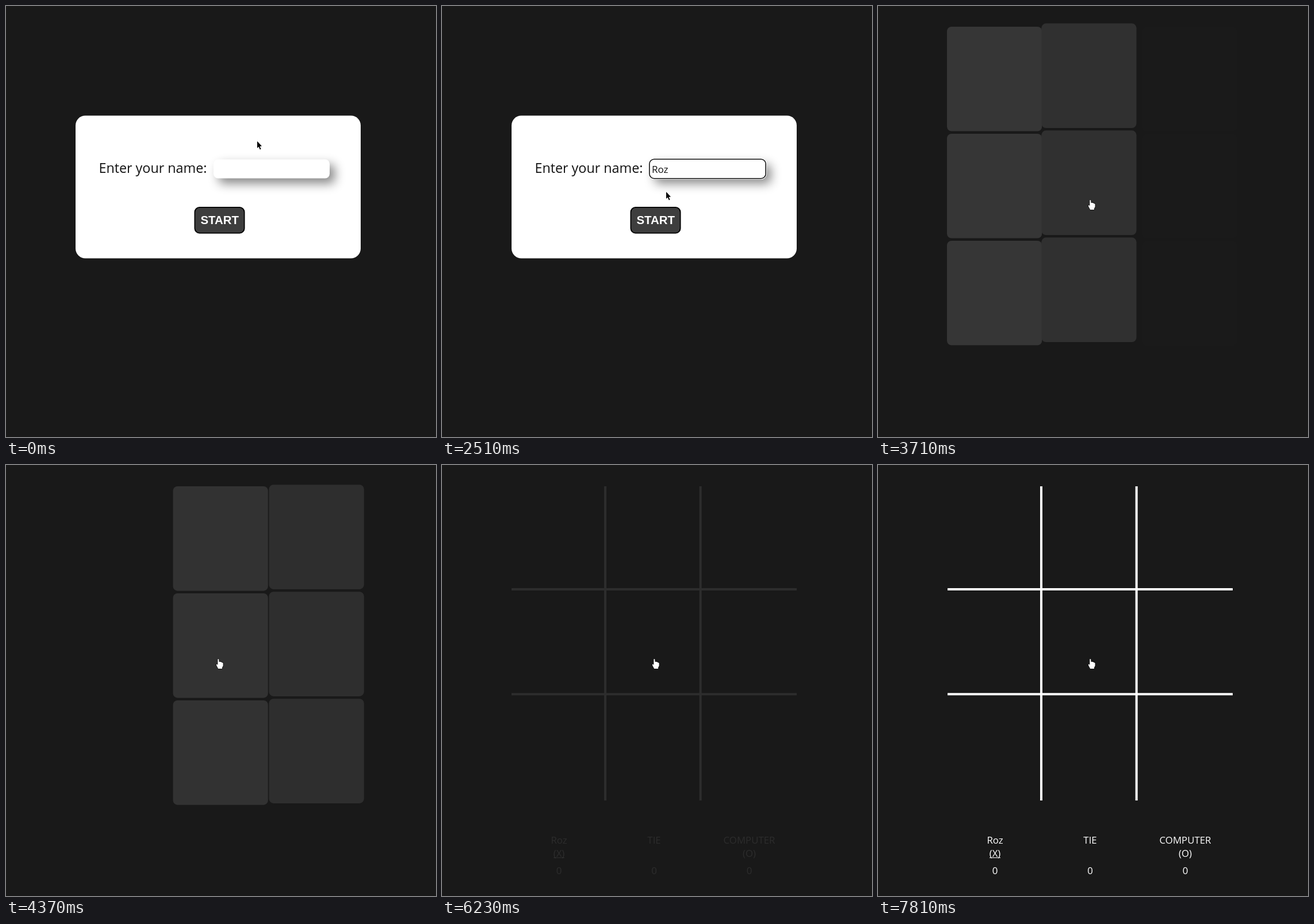
Recreate the animation shown at these times as an HTML page with a canvas. Size 748 px wide and 749 px high, loop 8000 ms.

```html
<!DOCTYPE html>
<html lang="en">
<head>
<meta charset="utf-8">
<title>Tic-tac-toe start</title>
<style>
  html, body { margin: 0; width: 100%; height: 100%; overflow: hidden; background: #191919; }
  canvas { display: block; }
</style>
</head>
<body>
<canvas id="stage" width="748" height="749"></canvas>
<script>
const ctx = document.getElementById('stage').getContext('2d');
const LOOP = 8000;
const PLAYER = 'Roz';
const SANS = '"Open Sans", sans-serif';
const KEY_TIMES = [1460, 1790, 1920];
const FOCUS_TIME = 500;
const PANEL_END = 2840;
const FADE_TIMES = [6230, 6430, 6630, 6760, 6890, 7020, 7150, 7290, 7394, 7498, 7602, 7706, 7810];
const COLUMNS = [
  { start: 2920, end: 4110, fill: '#363636' },
  { start: 3300, end: 4830, fill: '#323232' },
  { start: 3680, end: 5560, fill: '#2e2e2e' }
];

const clamp = v => Math.max(0, Math.min(1, v));
const progress = (t, from, to) => clamp((t - from) / (to - from));
const lerp = (a, b, p) => a + (b - a) * p;

function roundRect(x, y, w, h, r, fill) {
  ctx.beginPath();
  ctx.roundRect(x, y, w, h, r);
  ctx.fillStyle = fill;
  ctx.fill();
}

function text(str, x, y, font, color, align = 'left') {
  ctx.font = font;
  ctx.textAlign = align;
  ctx.fillStyle = color;
  ctx.fillText(str, x, y);
}

function polygon(x, y, points, fill, stroke) {
  ctx.beginPath();
  points.forEach(([px, py]) => ctx.lineTo(x + px, y + py));
  ctx.closePath();
  ctx.lineWidth = 1.4;
  ctx.lineJoin = 'round';
  ctx.strokeStyle = stroke;
  ctx.stroke();
  ctx.fillStyle = fill;
  ctx.fill();
}

const cursors = {
  arrow(x, y) {
    polygon(x, y, [[0, 0], [0, 12], [2.6, 9.6], [4.8, 14.4], [6.6, 13.6], [4.5, 9], [8, 8.6]], '#000', '#fff');
  },
  beam(x, y) {
    ctx.fillStyle = '#222';
    ctx.fillRect(x, y - 6, 1, 12);
    for (const edge of [-7, 6]) {
      ctx.fillRect(x - 3, y + edge, 3, 1);
      ctx.fillRect(x + 1, y + edge, 3, 1);
    }
  },
  hand(x, y) {
    polygon(x, y, [[-0.6, 0.3], [1.2, 0.3], [1.6, 5], [4, 5], [6.5, 6], [8.6, 7.2], [8.6, 12],
      [7, 15], [7, 17], [0.2, 17], [-3, 11], [-3, 9], [-0.6, 10]], '#fff', '#111');
  }
};

function drawCursor(t) {
  let x, y;
  if (t < 2310) {
    const p = progress(t, 30, 480);
    x = lerp(437, 431, p);
    y = lerp(235, 286, p);
  } else if (t < 3050) {
    const p = progress(t, 2270, 2740);
    x = lerp(431, 352, p);
    y = lerp(286, 359, p);
  } else {
    const p = t < 3120 ? 0.5 : 1;
    x = lerp(352, 369, p);
    y = lerp(359, 337, p);
  }
  x = Math.round(x);
  y = Math.round(y);
  const overInput = t < PANEL_END && y > 266 && y < 300;
  const overButton = x < 415 && y > 349;
  const kind = overInput ? 'beam' : overButton || t >= PANEL_END ? 'hand' : 'arrow';
  cursors[kind](x, y);
}

function drawInput(t) {
  ctx.save();
  ctx.shadowColor = '#888';
  ctx.shadowBlur = 18;
  ctx.shadowOffsetX = ctx.shadowOffsetY = 9;
  roundRect(361, 266.5, 202, 33, 8, '#fff');
  ctx.restore();
  if (t < FOCUS_TIME) return;

  roundRect(359, 264.5, 206, 37, 10, '#fff');
  roundRect(360, 265.5, 204, 35, 9, '#101010');
  roundRect(361.6, 267.1, 200.8, 31.8, 7.5, '#fff');

  const typed = PLAYER.slice(0, KEY_TIMES.filter(k => t >= k).length);
  text(typed, 365, 290, '17px ' + SANS, '#111');
  const lastAction = KEY_TIMES.filter(k => t >= k).pop() ?? FOCUS_TIME;
  if ((t - lastAction) % 1000 < 490) {
    ctx.fillStyle = '#000';
    ctx.fillRect(Math.round(365 + ctx.measureText(typed).width), 272, 1, 23);
  }
}

function drawPanel(t) {
  roundRect(121, 190.5, 496, 248, 17, '#fff');
  text('Enter your name:', 161.5, 290, '23.3px ' + SANS, '#111');
  drawInput(t);
  roundRect(327.5, 349, 88, 46.5, 9, '#000');
  roundRect(329.3, 350.8, 84.4, 42.9, 7.5, '#3e3e3e');
  text('START', 371.7, 379, 'bold 20.4px "Liberation Sans", Arial, sans-serif', '#fff', 'center');
}

function drawTiles(t) {
  if (t < 3320) return;
  COLUMNS.forEach(({ start, end, fill }, col) => {
    if (t < start || t >= end) return;
    const p = progress(t, start, start + 860);
    const swing = 1 - Math.abs(2 * p - 1);
    ctx.globalAlpha = clamp(2 * p);
    for (let row = 0; row < 3; row++) {
      roundRect(121 + 169.5 * col - 6.5 * swing, 37 + 186 * row - 7 * swing, 165.3, 181.7, 8, fill);
    }
  });
  ctx.globalAlpha = 1;
}

function drawBoard(t) {
  const step = FADE_TIMES.filter(s => t >= s).pop();
  if (!step) return;
  ctx.globalAlpha = progress(step, 5800, 7800) ** 1.6;
  ctx.fillStyle = '#fff';
  ctx.beginPath();
  for (const x of [282, 447.7]) ctx.rect(x, 37, 4, 546);
  for (const y of [214, 396.3]) ctx.rect(121, y, 496, 4);
  ctx.fill();

  const font = '16.8px ' + SANS;
  [[PLAYER, '(X)'], ['TIE', ''], ['COMPUTER', '(O)']].forEach(([name, mark], i) => {
    const x = 203.5 + 165.5 * i;
    text(name, x, 658, font, '#fff', 'center');
    text(mark, x, 681, font, '#fff', 'center');
    text('0', x, 711, font, '#fff', 'center');
  });
  ctx.fillRect(194, 682, 19, 1);
  ctx.globalAlpha = 1;
}

function render(now) {
  const t = now % LOOP;
  ctx.fillStyle = '#191919';
  ctx.fillRect(0, 0, 748, 749);
  if (t < PANEL_END) drawPanel(t);
  drawTiles(t);
  drawBoard(t);
  drawCursor(t);
}

const began = performance.now();
function tick() {
  render(performance.now() - began);
  requestAnimationFrame(tick);
}
tick();
</script>
</body>
</html>
```
